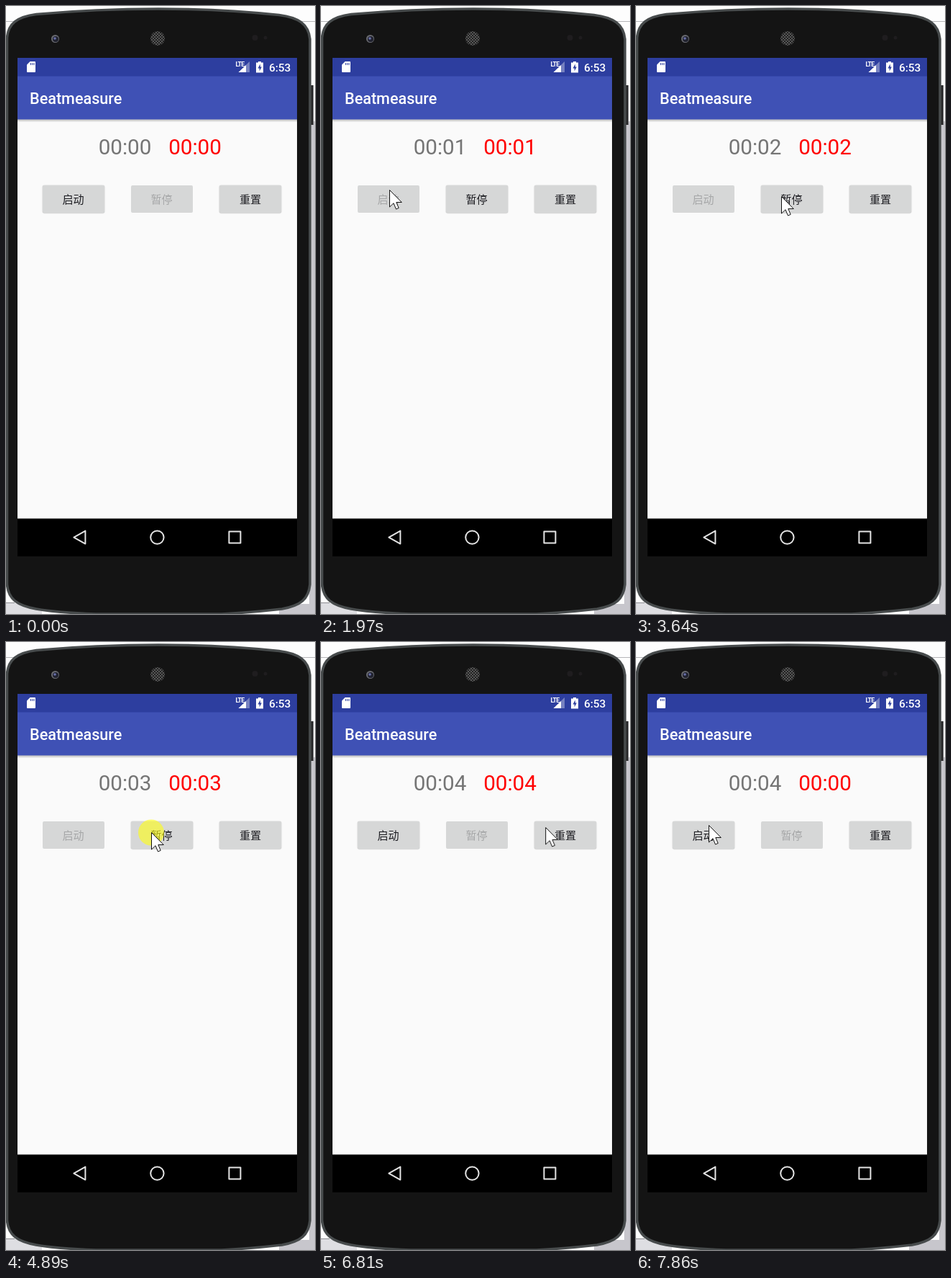
Recreate the animation shown at these times as an HTML page. Size 430 by 844 pixels, loop 8000 ms.

```html
<!DOCTYPE html>
<html lang="zh-CN">
<head>
<meta charset="utf-8">
<title>Stopwatch demo</title>
<style>
html, body { margin: 0; width: 100%; height: 100%; overflow: hidden; background: #fdfdfd; }
#stage { position: relative; width: 430px; height: 844px; overflow: hidden; }
svg { position: absolute; left: 0; top: 0; }
.ui { font-family: Roboto, sans-serif; font-weight: 500; fill: #fff; }

.timer {
  position: absolute; top: 176px; height: 40px; overflow: hidden;
  display: flex; white-space: pre;
  font: 29.6px/40px Roboto, sans-serif; color: #757575;
}
.red { color: #f00; }
.digits { animation: count 8s step-end infinite; }
.red .digits { animation-name: count-reset; }
@keyframes count {
  0% { transform: none; }
  24.625% { transform: translateY(-40px); }
  36.875% { transform: translateY(-80px); }
  49.125% { transform: translateY(-120px); }
  61.375%, 100% { transform: translateY(-160px); }
}
@keyframes count-reset {
  0%, 87.625%, 100% { transform: none; }
  24.625% { transform: translateY(-40px); }
  36.875% { transform: translateY(-80px); }
  49.125% { transform: translateY(-120px); }
  61.375% { transform: translateY(-160px); }
}

.button {
  --on: #1d1d22; --off: #a6a7a8;
  --raised: 0 .5px 1.5px rgba(0,0,0,.2), 0 0 1px .5px rgba(0,0,0,.08);
  position: absolute; top: 249px; width: 86px; height: 38px;
  border-radius: 2px; overflow: hidden; background: #d6d7d7;
  font: 15.1px/36px "Noto Sans CJK SC", "Noto Sans CJK", sans-serif;
  text-align: center; color: var(--on); box-shadow: var(--raised);
}
.start { left: 50.5px; animation: start 8s step-end infinite; }
.pause { left: 173.5px; animation: pause 8s step-end infinite; }
.reset { left: 297px; }
@keyframes start {
  0%, 62.875%, 100% { color: var(--on); box-shadow: var(--raised); }
  10.875% { color: var(--off); box-shadow: none; }
}
@keyframes pause {
  0%, 62.875%, 100% { color: var(--off); box-shadow: none; }
  10.875% { color: var(--on); box-shadow: var(--raised); }
}
.button::after {
  content: ""; position: absolute; inset: 0; background: #000;
  opacity: 0; animation: 8s step-end infinite;
}
.start::after { inset: -10px 16px 3px; border-radius: 50%; animation-name: ripple-start; }
.pause::after { animation-name: ripple-pause; }
.reset::after { animation-name: ripple-reset; }
@keyframes ripple-start { 0%, 18.625%, 100% { opacity: 0; } 10.875% { opacity: .03; } }
@keyframes ripple-pause { 0%, 69.125%, 100% { opacity: 0; } 62.375% { opacity: .03; } }
@keyframes ripple-reset { 0%, 90.5%, 100% { opacity: 0; } 87% { opacity: .05; } }

.cursor { animation: move 8s linear infinite; }
@keyframes move {
  0%, .74% { transform: translate(327px, 850px); }
  .75% { transform: translate(321px, 832px); }
  2.5% { transform: translate(250px, 640px); }
  4.5% { transform: translate(150px, 400px); }
  6.875% { transform: translate(106px, 285px); }
  8.625%, 36.875% { transform: translate(95px, 255px); }
  40.625% { transform: translate(131px, 261px); }
  43% { transform: translate(170px, 267px); }
  45.5%, 71% { transform: translate(202px, 264px); }
  74%, 81.375% { transform: translate(127px, 264px); }
  83.25% { transform: translate(215px, 264px); }
  85.125% { transform: translate(312px, 257px); }
  85.7%, 89% { transform: translate(318px, 257px); }
  91.375% { transform: translate(246px, 263px); }
  93.5% { transform: translate(195px, 246px); }
  96% { transform: translate(130px, 242px); }
  98.25%, 100% { transform: translate(101px, 254px); }
}
.press { animation: press 8s step-end infinite; }
@keyframes press {
  0%, 10.125%, 62.25%, 87%, 100% { opacity: 0; }
  9.25%, 61.125%, 86% { opacity: 1; }
}
</style>
</head>
<body>
<div id="stage">
  <svg width="430" height="844">
    <defs>
      <pattern id="mesh" width="4" height="4" patternUnits="userSpaceOnUse">
        <circle cx="1" cy="1" r="1" fill="#686868"/>
        <circle cx="3" cy="3" r="1" fill="#686868"/>
      </pattern>
      <linearGradient id="shade" x2="0" y2="1">
        <stop stop-opacity=".25"/><stop offset="1" stop-opacity="0"/>
      </linearGradient>
    </defs>

    <path d="M0 21.5H430" stroke="#b5b5b8"/>
    <path d="M422 160h8V844H380V830H422Z" fill="#c7c6cc"/>
    <path d="M0 829H50V844H0Z" fill="#dedee2"/>
    <path d="M0 828.5H12" stroke="#8b8b90"/>
    <rect x="422" y="110" width="6" height="55" rx="1" fill="#29292a"/>
    <path d="M427.5 111V164" stroke="#5b5b5d"/>
    <path d="M1.5 44C3 25 15 15 42 11.500Q125 4 212 4T380 12.500C407 16 421 25 423 46V803C421 823 411 832 384 837Q340 842 300 844H125Q70 842 42 837C15 832 3 823 1.500 803Z"
      fill="#141414" stroke="#474b4c" stroke-width="3.500"/>

    <circle cx="68.500" cy="45.500" r="5.500" fill="#6a6b70"/>
    <circle cx="69" cy="46" r="4" fill="#20222f"/>
    <circle cx="68" cy="45" r="1.800" fill="#686fa8"/>
    <circle cx="211" cy="45" r="10" fill="#222"/>
    <circle cx="211" cy="45" r="10" fill="url(#mesh)"/>
    <circle cx="346.500" cy="44" r="4" fill="#1f1d1f"/>
    <circle cx="361" cy="44" r="2.500" fill="#1f1d1f"/>

    <rect x="16" y="72" width="389" height="640" fill="#fafafa"/>
    <rect x="16" y="72" width="389" height="26" fill="#2d3e9f"/>
    <rect x="16" y="97.500" width="389" height="60" fill="#3f51b5"/>
    <rect x="16" y="157.500" width="389" height="4" fill="url(#shade)"/>
    <rect x="16" y="711.500" width="389" height="52.500"/>

    <path d="M33.500 77H40Q41 77 41 78V91Q41 92 40 92H30Q29 92 29 91V81.500Z" fill="#fff"/>
    <path d="M34.500 79v3M36.800 79v3M39 79v3" stroke="#2d3e9f"/>
    <path d="M339 77V92H323.500Z" fill="#fff" opacity=".35"/>
    <path d="M334 82V92H323.500Z" fill="#fff"/>
    <path d="M351 77h4v1.500h3V92.500H348V78.500h3Z" fill="#fff"/>
    <path d="M353.800 80.500L350.500 86.500H352.700V90.500L355.800 84.500H353.800Z" fill="#2d3e9f"/>
    <g class="ui">
      <text x="319.500" y="83.500" font-size="8.600" font-weight="700" letter-spacing="-.7">LTE</text>
      <text x="366" y="91" font-size="15.400">6:53</text>
      <text x="33" y="136" font-size="21.600">Beatmeasure</text>
    </g>

    <g fill="none" stroke="#e4e4e4" stroke-width="2" stroke-linejoin="round" transform="translate(.4 -.4)">
      <path d="M110 729V747L94 738Z"/>
      <circle cx="210" cy="738" r="9.200"/>
      <rect x="310" y="730" width="16" height="16"/>
    </g>
  </svg>

  <div class="timer" style="left:128.700px">00:0<div class="digits">0<br>1<br>2<br>3<br>4</div></div>
  <div class="timer red" style="left:226.200px">00:0<div class="digits">0<br>1<br>2<br>3<br>4</div></div>

  <div class="button start">启动</div>
  <div class="button pause">暂停</div>
  <div class="button reset">重置</div>

  <svg width="430" height="844">
    <g class="cursor">
      <circle class="press" r="18" cy=".5" fill="#ff1" fill-opacity=".6"/>
      <path d="M.5.500V24L6 18.700 9.500 27 13.200 25.400 9.800 17.500H17.300Z" fill="#fff" stroke="#111"/>
    </g>
  </svg>
</div>
</body>
</html>
```
